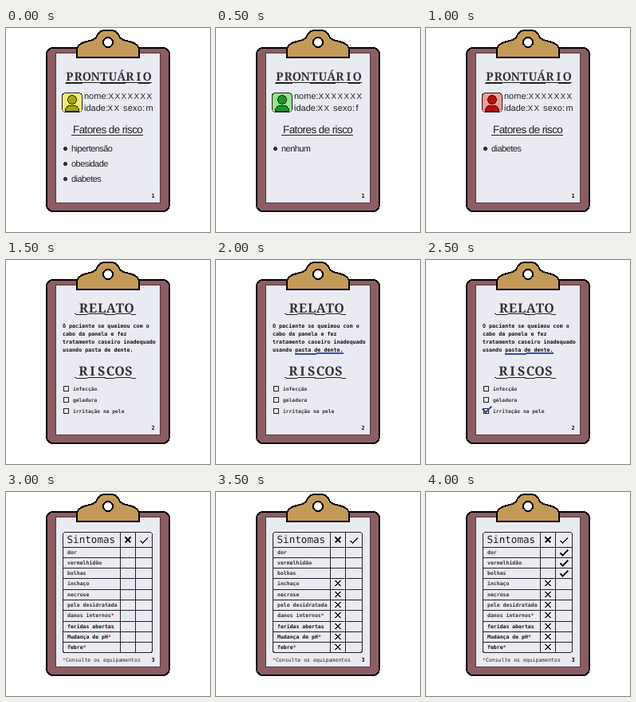
An HTML page that plays this animation: 256 by 256 pixels, repeating every 4.5 s.

```html
<!DOCTYPE html>
<html lang="pt">
<head>
<meta charset="utf-8">
<title>Prontuário</title>
<style>
  html, body { margin: 0; width: 100%; height: 100%; overflow: hidden; background: #fff; }
  svg { display: block; width: 100vw; height: 100vh; shape-rendering: crispEdges; text-rendering: geometricPrecision; }
  text { fill: #222; white-space: pre; }
  .title { font-family: "Noto Serif", serif; font-weight: 600; text-anchor: middle; fill: #333; }
  .sans { font-family: "Liberation Sans", Arial, sans-serif; }
  .mono { font-family: "DejaVu Sans Mono", monospace; }
  .bold { font-weight: bold; fill: #111; }
  .dark { font-weight: bold; fill: #333; }
  .line { fill: none; stroke: #222; }
  .ink { fill: none; stroke: #3850b0; }
  .mark { fill: none; stroke: #222; stroke-width: 2; }
</style>
</head>
<body>
<svg viewBox="0 0 256 256">
  <rect x="51" y="25" width="154" height="205" rx="8" fill="#8c5e63" stroke="#000" stroke-width="2"/>
  <rect x="62.5" y="31.5" width="131" height="188" fill="#eaebf2" stroke="#54393f"/>
  <g id="pages"></g>
  <path d="M89 37H80V31L82 28L86 25L90 24L93 21L97 18L104 16L110 14L114 11L116 7L120 4L124 3H132L136 4L140 7L142 11L146 14L152 16L159 18L163 21L166 24L167 28V37Z" id="clip" fill="#c39a58" stroke="#000" stroke-width="2"/>
  <circle cx="128" cy="18" r="6" fill="#fff" stroke="#000" stroke-width="2"/>
</svg>
<script>
const NS = "http://www.w3.org/2000/svg";
const STEP = 500, LOOP = 4500;
const pages = document.getElementById("pages");

// The clip is symmetric: mirror its left half around x = 128.
const half = [[89, 37], [89, 26], [91, 22], [95, 19], [101, 17], [109, 15], [113, 12], [115, 8], [119, 4], [123, 3]];
const outline = [...half, ...half.map(([x, y]) => [256 - x, y]).reverse()];
document.getElementById("clip").setAttribute("d", "M" + outline.join("L") + "Z");

function add(parent, tag, attrs = {}, content = "") {
  const el = document.createElementNS(NS, tag);
  for (const key in attrs) el.setAttribute(key, attrs[key]);
  el.textContent = content;
  parent.appendChild(el);
  return el;
}
const group = (parent, attrs) => add(parent, "g", attrs);
const path = (parent, d, cls = "line", attrs = {}) => add(parent, "path", { d, class: cls, ...attrs });
const label = (parent, str, x, y, size, cls = "sans", spacing = 0) =>
  add(parent, "text", { x, y, "font-size": size, class: cls, "letter-spacing": spacing }, str);

// Typewriter heading: every letter is centred in an equal cell.
function heading(parent, str, mid, y, size, pitch) {
  const x = [...str].map((_, i) => mid + (i - (str.length - 1) / 2) * pitch).join(" ");
  add(parent, "text", { x, y, "font-size": size, class: "title" }, str);
}
const pageNumber = (parent, n) => label(parent, n, 182.5, 213, 7, "mono bold");
const cross = (parent, x, y) => path(parent, `M${x - 3.5} ${y - 3.5}l7 7m0 -7l-7 7`, "mark");
const tick = (parent, x, y) => path(parent, `M${x - 4.5} ${y + 1}l3 3l6.5 -6.5`, "mark");

// Page 1: record
const record = group(pages);
heading(record, "PRONTUÁRIO", 128.5, 66, 14.5, 10.8);
path(record, "M75 68.5H183M74 69.5H96M118 69.5H150M166 69.5H181");
const face = add(record, "rect", { x: 70.5, y: 81.5, width: 25, height: 24, rx: 4, stroke: "#222" });
const person = group(record, { stroke: "#222" });
path(person, "M74.5 104.5V102L77 98.5L80 97H86L89 98.5L91.5 102V104.5Z", "");
add(person, "circle", { cx: 83, cy: 90, r: 5.5 });
label(record, "nome:", 98, 89, 11);
label(record, "XXXXXXX", 128.5, 89, 10, "sans", 1.35);
label(record, "idade:", 98, 104, 11);
label(record, "XX", 127.5, 104, 10, "sans", 1.35);
label(record, "sexo:", 147, 104, 11, "sans", .2);
const sex = label(record, "m", 175.5, 104, 11);
label(record, "Fatores de risco", 84, 132, 13.5, "sans", -.6);
path(record, "M82 134.5H172");
pageNumber(record, 1);

const patients = [
  { light: "#f1ee73", dark: "#aaa407", sex: "m", risks: ["hipertensão", "obesidade", "diabetes"] },
  { light: "#93e28d", dark: "#159a25", sex: "f", risks: ["nenhum"] },
  { light: "#f39b90", dark: "#c30909", sex: "m", risks: ["diabetes"] }
];
for (const p of patients) {
  p.list = group(record);
  p.risks.forEach((risk, i) => {
    const y = 155 + 19 * i;
    add(p.list, "circle", { cx: 74.5, cy: y - 3.5, r: 2.5, fill: "#333" });
    label(p.list, risk, 82, y, 11, "sans", -.55);
  });
}

// Page 2: report
const report = group(pages);
const wave = "l4 1h10l4 -1h18l5 1h8l4 -1h16l4 1h4";
heading(report, "RELATO", 126, 66, 16, 11.4);
path(report, "M86 67.5" + wave);
["O paciente se queimou com o", "cabo da panela e fez", "tratamento caseiro inadequado", "usando pasta de dente."]
  .forEach((str, i) => label(report, str, 71, 85 + 10 * i, 6.7, "mono bold"));
heading(report, "RISCOS", 125.5, 145, 16, 11.4);
path(report, "M86 147.5" + wave);
["infecção", "geladura", "irritação na pele"].forEach((str, i) => {
  const y = 158 + 14 * i;
  add(report, "rect", { x: 72.5, y: y + .5, width: 6, height: 6, class: "line" });
  label(report, str, 84, y + 5.5, 6.3, "mono dark");
});
pageNumber(report, 2);
const underline = path(report, "M99 117.5H126L130 116.5H160", "ink", { "stroke-width": 2 });
const chosen = path(report, "M71 187L75 191L82 184", "ink", { "stroke-width": 2 });

// Page 3: symptoms
const table = group(pages);
const rowY = i => Math.floor(69 + 13.3 * i);
add(table, "rect", { x: 71.5, y: 50.5, width: 112, height: 151, rx: 3, class: "line" });
path(table, "M143.5 50V201M162.5 50V201");
label(table, "Sintomas", 76.5, 64, 12.6, "mono");
cross(table, 153, 60);
tick(table, 173, 60);
const crosses = group(table), ticks = group(table);
["dor", "vermelhidão", "bolhas", "inchaço", "necrose", "pele desidratada", "danos internos*",
 "feridas abertas", "Mudança de pH*", "febre*"].forEach((str, i) => {
  const y = rowY(i);
  path(table, `M71 ${y + .5}H183`);
  const cell = label(table, str.replace("*", ""), 77, y + 9, 6.5, i > 6 ? "mono bold" : "mono dark");
  if (str.endsWith("*")) add(cell, "tspan", { fill: "#c01828" }, "*");
  if (i < 3) tick(ticks, 173, y + 6.5);
  else cross(crosses, 153, y + 6.5);
});
const note = label(table, "", 71, 212.5, 6.5, "mono");
add(note, "tspan", { fill: "#c01828" }, "*");
add(note, "tspan", {}, "Consulte os equipamentos");
pageNumber(table, 3);

const show = (el, on) => el.setAttribute("display", on ? "inline" : "none");

function update(time) {
  const step = Math.floor((time % LOOP) / STEP);
  show(record, step < 3);
  show(report, step >= 3 && step < 6);
  show(table, step >= 6);
  if (step < 3) {
    const now = patients[step];
    face.setAttribute("fill", now.light);
    person.setAttribute("fill", now.dark);
    sex.textContent = now.sex;
    patients.forEach(p => show(p.list, p === now));
  }
  show(underline, step >= 4);
  show(chosen, step >= 5);
  show(crosses, step >= 7);
  show(ticks, step >= 8);
}

const start = performance.now();
function play() {
  update(performance.now() - start);
  requestAnimationFrame(play);
}
play();
</script>
</body>
</html>
```
